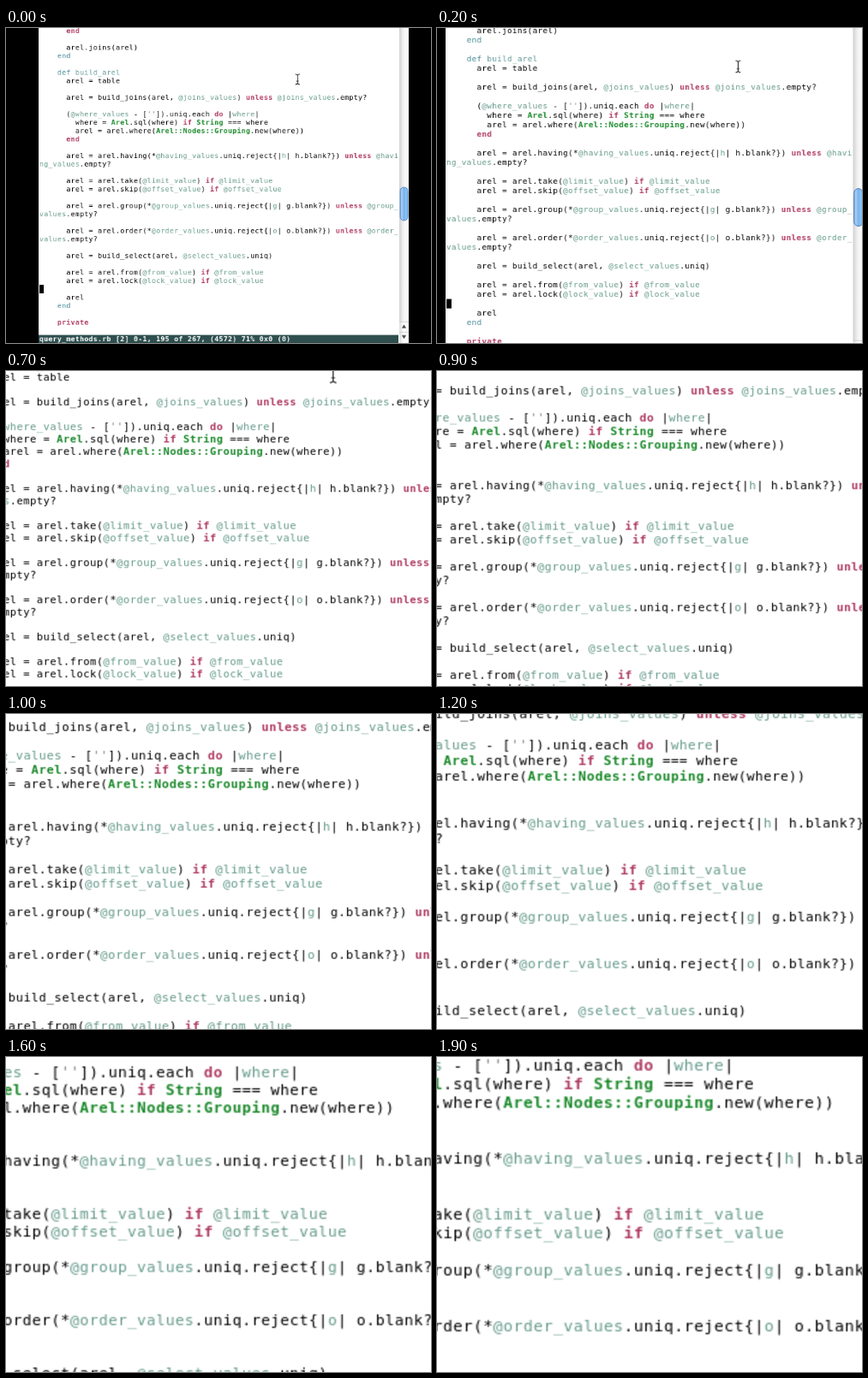
Write an HTML page with a canvas that moves like this. It is 496 by 368 pixels and loops after 2.4 s.

```html
<!DOCTYPE html>
<html lang="en">
<head>
<meta charset="utf-8">
<title>Editor zoom</title>
<style>
  html, body { margin: 0; width: 100%; height: 100%; overflow: hidden; background: #000; }
  canvas { display: block; }
</style>
</head>
<body>
<canvas id="stage" width="496" height="368"></canvas>
<script>
const LOOP = 2400, STEP = 100, LAST_STEP = 19;
const CELL_W = 7, CELL_H = 13, COLS = 80;
const LEFT = 52, TOP = -2;           // terminal origin in screen pixels
const BASE = 5.24 / CELL_W;          // stage pixels per screen pixel before zooming
const FOCUS = { x: 254.3, y: 174 };  // the point that stays still

// [step, zoom]
const ZOOM = [[0, 1], [2, 1.13], [5, 1.342], [9, 1.626], [12, 1.876],
  [14, 2.008], [17, 2.185], [18, 2.229], [19, 2.236]];

const CODE = `
      end

      arel.joins(arel)
    end

    def build_arel
      arel = table

      arel = build_joins(arel, @joins_values) unless @joins_values.empty?

      (@where_values - ['']).uniq.each do |where|
        where = Arel.sql(where) if String === where
        arel = arel.where(Arel::Nodes::Grouping.new(where))
      end

      arel = arel.having(*@having_values.uniq.reject{|h| h.blank?}) unless @having_values.empty?

      arel = arel.take(@limit_value) if @limit_value
      arel = arel.skip(@offset_value) if @offset_value

      arel = arel.group(*@group_values.uniq.reject{|g| g.blank?}) unless @group_values.empty?

      arel = arel.order(*@order_values.uniq.reject{|o| o.blank?}) unless @order_values.empty?

      arel = build_select(arel, @select_values.uniq)

      arel = arel.from(@from_value) if @from_value
      arel = arel.lock(@lock_value) if @lock_value

      arel
    end

    private`.slice(1).split("\n");
const STATUS = "query_methods.rb [2] 0-1, 195 of 267, (4572) 71% 0x0 (0)";
const CURSOR_ROW = 31, STATUS_ROW = 37;

const PLAIN = { color: "#000" };
const RULES = [
  { match: /\b(?:unless|if|do|end|private)\b/g, color: "#b03c63", bold: true },
  { match: /\b(?:Arel|String)\b(?:::\w+)*/g, color: "#1c8a2c", bold: true },
  { match: /@\w+|(?<=\|)\w+(?=\|)/g, color: "#659a8b" },
  { match: /(?<=def )\w+/g, color: "#659a9a" },
  { match: /^ {4}(?:def|end)\b/g, color: "#468a98" },
  { match: /''/g, color: "#80808a" }
];

function stylesOf(line) {
  const styles = Array(line.length).fill(PLAIN);
  for (const rule of RULES)
    for (const m of line.matchAll(rule.match))
      styles.fill(rule, m.index, m.index + m[0].length);
  return styles;
}

function drawChar(g, ch, col, row, style) {
  g.font = (style.bold ? "bold " : "") + '11px "DejaVu Sans Mono", monospace';
  g.fillStyle = style.color;
  g.fillText(ch, LEFT + col * CELL_W, TOP + row * CELL_H + 10);
}

function drawText(g) {
  let row = 0;
  for (const line of CODE) {
    const styles = stylesOf(line);
    [...line].forEach((ch, i) => {
      if (ch !== " ") drawChar(g, ch, i % COLS, row + Math.floor(i / COLS), styles[i]);
    });
    row += Math.max(1, Math.ceil(line.length / COLS));
  }
  g.fillStyle = "#000";
  g.fillRect(LEFT, TOP + CURSOR_ROW * CELL_H, CELL_W, CELL_H);

  g.fillStyle = "#2f4f4f";
  g.fillRect(LEFT - 1, TOP + STATUS_ROW * CELL_H, COLS * CELL_W + 1, CELL_H + 1);
  [...STATUS].forEach((ch, i) => drawChar(g, ch, i, STATUS_ROW, { color: "#fff", bold: true }));
}

function across(g, x, w, colors) {
  const grad = g.createLinearGradient(x, 0, x + w, 0);
  colors.forEach((c, i) => grad.addColorStop(i / (colors.length - 1), c));
  return grad;
}

function triangle(g, x, y, dir) {
  g.beginPath();
  g.moveTo(x - 3.5, y + 2.5 * dir);
  g.lineTo(x + 3.5, y + 2.5 * dir);
  g.lineTo(x, y - 3 * dir);
  g.fill();
}

function drawScrollbar(g) {
  const x = 613, w = 15, mid = x + w / 2;
  g.fillStyle = across(g, x, w, ["#cfcfcf", "#ececec", "#fafafa", "#f0f0f0"]);
  g.fillRect(x, 0, w, 492);

  g.fillStyle = across(g, x, w, ["#4a80c4", "#a9d0f6", "#78b2ee", "#8cc6f8", "#4f8acb"]);
  g.strokeStyle = "#3e70b4";
  g.beginPath();
  g.roundRect(x + 1.5, 248.5, w - 3, 52, 6);
  g.fill();
  g.stroke();

  g.fillStyle = across(g, x, w, ["#dcdcdc", "#fff", "#f4f4f4"]);
  g.fillRect(x, 458, w, 34);
  g.fillStyle = "#c4c4c4";
  g.fillRect(x, 458, w, 1);
  g.fillRect(x, 474, w, 1);
  g.fillStyle = "#444";
  triangle(g, mid, 466, 1);
  triangle(g, mid, 482, -1);
}

function drawPointer(g, x, y) {
  g.strokeStyle = "#222";
  g.lineWidth = 1.2;
  g.beginPath();
  for (const d of [-1, 1]) {
    g.moveTo(x - 3.5, y + 8 * d);
    g.quadraticCurveTo(x, y + 8 * d, x, y + 5.5 * d);
    g.quadraticCurveTo(x, y + 8 * d, x + 3.5, y + 8 * d);
  }
  g.moveTo(x, y - 6);
  g.lineTo(x, y + 6);
  g.moveTo(x - 2, y + 3);
  g.lineTo(x + 2, y + 3);
  g.stroke();
}

function makeScreen() {
  const screen = document.createElement("canvas");
  screen.width = 664;
  screen.height = 492;
  const g = screen.getContext("2d");
  g.fillStyle = "#000";
  g.fillRect(0, 0, 664, 492);
  g.fillStyle = "#fff";
  g.fillRect(LEFT - 1, 0, 577, 492);
  drawText(g);
  drawScrollbar(g);
  drawPointer(g, 454.5, 80);
  return screen;
}

function zoomAt(step) {
  const i = Math.max(1, ZOOM.findIndex(([n]) => n >= step));
  const [n0, z0] = ZOOM[i - 1], [n1, z1] = ZOOM[i];
  return z0 + (z1 - z0) * (step - n0) / (n1 - n0);
}

const ctx = document.getElementById("stage").getContext("2d");
const screen = makeScreen();

function draw(time) {
  const step = Math.min(LAST_STEP, Math.floor(time % LOOP / STEP));
  const zoom = zoomAt(step), scale = BASE * zoom;
  ctx.imageSmoothingQuality = "high";
  ctx.fillStyle = "#000";
  ctx.fillRect(0, 0, 496, 368);
  ctx.drawImage(screen, FOCUS.x * (1 - zoom), FOCUS.y * (1 - zoom),
    screen.width * scale, screen.height * scale);
}

const start = performance.now();
function tick() {
  draw(performance.now() - start);
  requestAnimationFrame(tick);
}
tick();
</script>
</body>
</html>
```
